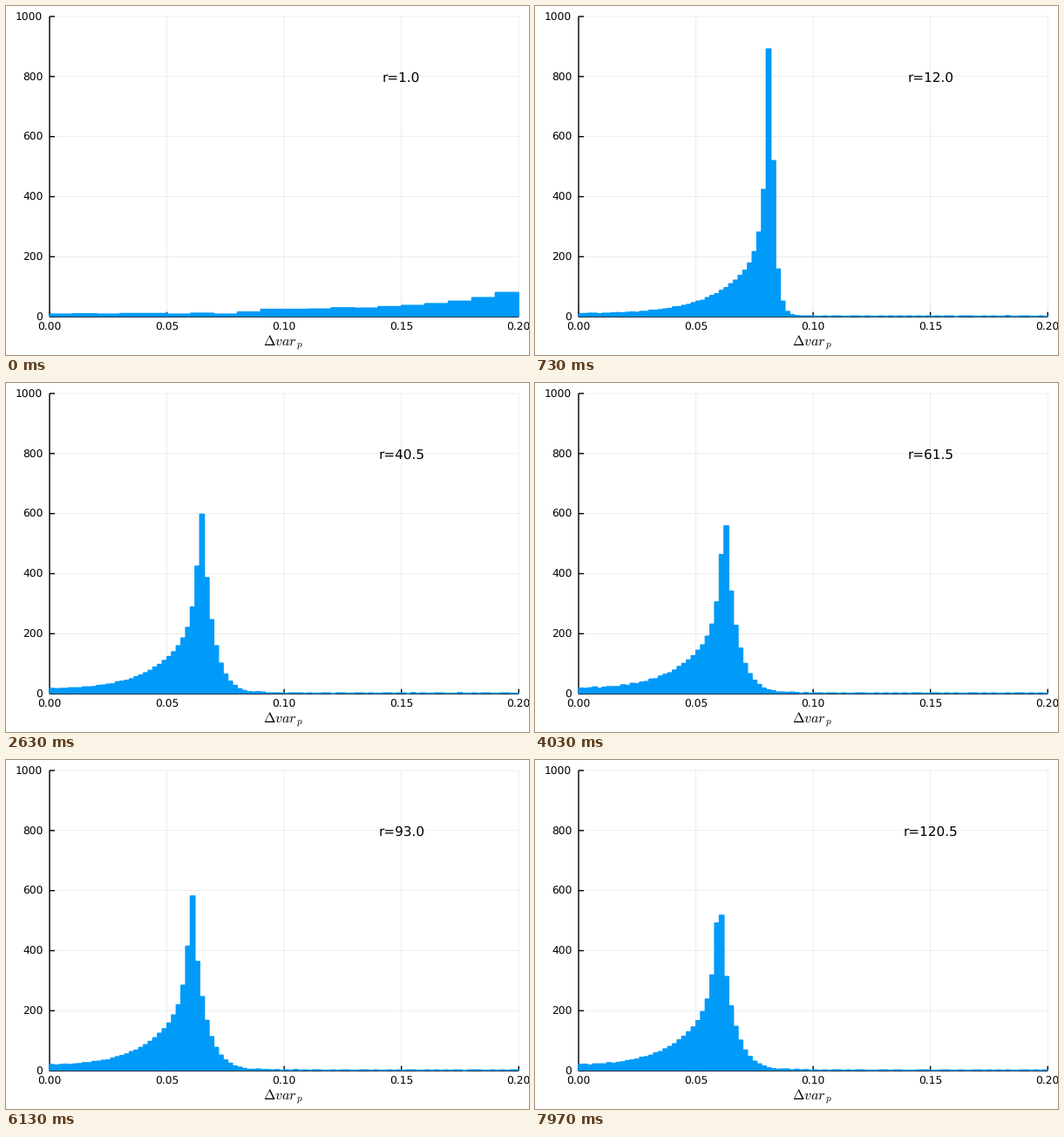
A matplotlib script for the animation above (8 s loop, 600 px wide and 400 px high).

```python
import numpy as np
import matplotlib
import matplotlib.pyplot as plt
from matplotlib.animation import FuncAnimation

matplotlib.rcParams["font.family"] = "DejaVu Sans"
matplotlib.rcParams["mathtext.fontset"] = "cm"
matplotlib.rcParams["text.hinting"] = "none"

W, H, DPI = 600, 400, 100
LEFT, RIGHT, TOP, BOTTOM = 50, 588.2, 12, 356.2
X_MAX, Y_MAX = 0.2, 1000
FRAMES, TICK_MS = 400, 20
BIN = 0.002
BLUE = "#009af9"

rng = np.random.default_rng(4)


def uniform(n):
    """Evenly spread random numbers between 0 and 1."""
    return (np.arange(n) + rng.random(n)) / n


def exponential(n):
    return -np.log(1 - uniform(n))


# The sample: a sharp mode with a long left and a short right side,
# a flat floor below it and a thin tail far above.
near_left = exponential(490)
far_left = exponential(2240)
right = exponential(1300)
floor = uniform(260)
TAIL_START, TAIL_SPAN = 0.086, 0.16
tail = uniform(200) * TAIL_SPAN


def sample(r):
    mode = 0.0583 + 0.28 / (r + 0.3)
    spread = max(2.85 - 24 / r, 0.8)
    return np.concatenate([
        np.abs(mode - BIN * near_left),
        np.abs(mode - 7.8 * BIN * (1 + 1 / r) * far_left),
        mode + BIN * spread * right,
        mode * floor,
        TAIL_START + (tail - 0.22 / r) % TAIL_SPAN,
    ])


def histogram(r):
    width = 0.01 if r < 1.5 else 0.005 if r < 7.5 else BIN
    edges = np.linspace(0, X_MAX, round(X_MAX / width) + 1)
    counts = np.histogram(sample(r), edges)[0]
    return np.minimum(counts, Y_MAX), edges


def to_x(v):
    return LEFT + (RIGHT - LEFT) * v / X_MAX


def to_y(v):
    return BOTTOM - (BOTTOM - TOP) * v / Y_MAX


fig = plt.figure(figsize=(W / DPI, H / DPI), dpi=DPI, facecolor="white")
ax = fig.add_axes([0, 0, 1, 1])
ax.set_xlim(0, W)
ax.set_ylim(H, 0)
ax.axis("off")


def line(xs, ys, width=1, alpha=1):
    ax.plot(xs, ys, color="black", lw=width, alpha=alpha, snap=False,
            zorder=1 + alpha, solid_capstyle="butt")


def grid(xs, ys):
    line(xs, ys, 0.5, 0.1)


def label(x, y, s, size, ha="center"):
    return ax.text(x, y, s, size=size, ha=ha, va="baseline", zorder=5)


for v in np.linspace(0, X_MAX, 5):
    x = to_x(v)
    grid([x, x], [TOP, BOTTOM])
    line([x, x], [BOTTOM, BOTTOM - 5.5])
    label(x, 371.8, f"{v:.2f}", 8.8)
for v in range(0, Y_MAX + 1, 200):
    y = to_y(v)
    grid([LEFT, RIGHT], [y, y])
    line([LEFT, LEFT + 6], [y, y])
    label(42.3, y + 4.6, str(v), 8.8, "right")
line([LEFT, LEFT], [TOP, BOTTOM])
line([LEFT, RIGHT], [BOTTOM, BOTTOM])
label(318.3, 389, r"$\Delta var_{\,p}$", 11.6)

bars = ax.stairs([BOTTOM], [LEFT, RIGHT], baseline=BOTTOM, fill=True,
                 facecolor=BLUE, edgecolor=BLUE, lw=1, snap=False, zorder=3)
note = label(to_x(0.15), 86.4, "", 11)


def draw(i):
    # r grows by a half thirty times a second, on a 10 ms clock
    t = i * TICK_MS + TICK_MS // 2
    r = 1 + 0.5 * ((3 * t + 10) // 100)
    counts, edges = histogram(r)
    bars.set_data(to_y(counts), to_x(edges), BOTTOM)
    note.set_text(f"r={r:.1f}")
    return bars, note


anim = FuncAnimation(fig, draw, frames=FRAMES, interval=TICK_MS,
                     init_func=lambda: draw(0), repeat=True, repeat_delay=0)
plt.show()
```
